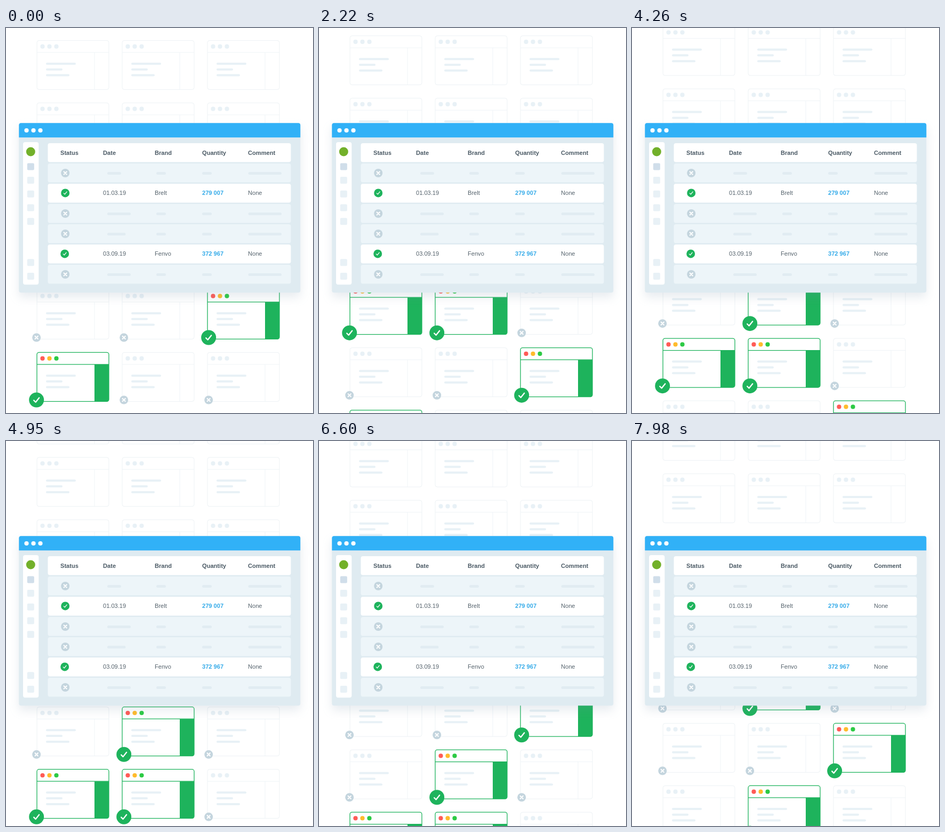
Animation, 576 px wide and 722 px high, one loop 8 s. Source, as an HTML page:

```html
<!DOCTYPE html>
<html lang="en">
<head>
<meta charset="utf-8">
<title>Report table</title>
<style>
  html, body { margin: 0; height: 100%; overflow: hidden; background: #fff; }
  svg { display: block; }
  #stage { width: 100vw; height: 100vh; }
  text { font: 11.1px "Liberation Sans", Arial, sans-serif; fill: #56636d; }
  .head { font-weight: bold; fill: #4b5a65; }
  .quantity { font-weight: bold; fill: #35abe9; }
  #window { filter: drop-shadow(0 9px 9px rgba(110, 135, 160, .16)); }
</style>
</head>
<body>
<svg id="stage" viewBox="0 0 576 722">
  <defs>
    <g id="lines" fill="#e8f1f6">
      <rect x="17" y="41.5" width="56" height="4" rx="2"/>
      <rect x="17" y="52.3" width="31" height="4" rx="2"/>
      <rect x="17" y="63.2" width="44" height="4" rx="2"/>
    </g>
    <g id="plain">
      <path d="M0 22.5H135M108 22.5V92" stroke="#eff4f7"/>
      <rect width="135" height="92" rx="4" fill="none" stroke="#edf2f5"/>
      <g fill="#e8f1f6">
        <circle cx="10.5" cy="11.3" r="4.1"/><circle cx="23.5" cy="11.3" r="4.1"/><circle cx="36.5" cy="11.3" r="4.1"/>
      </g>
      <use href="#lines"/>
    </g>
    <g id="active">
      <rect width="135" height="92" rx="4" fill="#fff" stroke="#1eb35c" stroke-width="1.3"/>
      <path d="M0 22.5H135" stroke="#1eb35c" stroke-width="1.3"/>
      <path d="M108 22.5H135V88a4 4 0 0 1-4 4H108z" fill="#1eb35c"/>
      <circle cx="10.5" cy="11.3" r="4.1" fill="#ff5b56"/>
      <circle cx="23.5" cy="11.3" r="4.1" fill="#ffbb2c"/>
      <circle cx="36.5" cy="11.3" r="4.1" fill="#2cca44"/>
      <use href="#lines"/>
    </g>
    <g id="check">
      <circle r="14" fill="#1eb35c"/>
      <path d="M-5 .8L-1.6 4.3L5-4" fill="none" stroke="#fff" stroke-width="2.3" stroke-linecap="round" stroke-linejoin="round"/>
    </g>
    <g id="cross">
      <circle r="8" fill="#c4d5de"/>
      <path d="M-2.6-2.6L2.6 2.6M2.6-2.6L-2.6 2.6" stroke="#fff" stroke-width="2.1" stroke-linecap="round"/>
    </g>
  </defs>

  <!-- Cards pass behind the window and come out checked -->
  <svg width="576" height="340" viewBox="0 0 576 340"><g id="incoming"></g></svg>
  <svg y="340" width="576" height="382" viewBox="0 340 576 382"><g id="outgoing"></g></svg>

  <g id="window">
    <rect x="24.3" y="178.3" width="528" height="318" rx="4" fill="#dfebf1"/>
    <path d="M24.3 205.3V182.3a4 4 0 0 1 4-4H548.3a4 4 0 0 1 4 4V205.3z" fill="#31b1f7"/>
  </g>
  <g fill="#fff">
    <circle cx="38.5" cy="192" r="4.1"/><circle cx="51.5" cy="192" r="4.1"/><circle cx="64.5" cy="192" r="4.1"/>
    <rect x="32" y="214" width="29.3" height="267.3" rx="4"/>
  </g>
  <circle cx="46.3" cy="232" r="8.5" fill="#72b02a"/>
  <g id="menu"></g>
  <g id="table"></g>
</svg>

<script>
const byId = id => document.getElementById(id);
const rect = (x, y, w, h, r, fill) =>
  `<rect x="${x}" y="${y}" width="${w}" height="${h}" rx="${r}" fill="${fill}"/>`;
const use = (id, x, y, scale = 1) =>
  `<use href="#${id}" transform="translate(${x} ${y}) scale(${scale})"/>`;
const label = (x, y, text, kind = "") => `<text x="${x}" y="${y}" class="${kind}">${text}</text>`;

// Sidebar and table
byId("menu").innerHTML = [260, 285.6, 311.3, 337, 362.7, 439.7, 465.4]
  .map((y, i) => rect(39.8, y - 6.5, 13, 13, 2, i ? "#e8f1f6" : "#d0deea")).join("");

const columns = [182, 279, 368, 454];
const rows = [
  { head: ["Date", "Brand", "Quantity", "Comment"] },
  { dateWidth: 26 },
  { values: ["01.03.19", "Brelt", "279 007", "None"], checkX: 111.2 },
  { dateWidth: 44 },
  { dateWidth: 34.5 },
  { values: ["03.09.19", "Fenvo", "372 967", "None"], checkX: 110.2 },
  { dateWidth: 44 },
];

function tableRow({ head, values, dateWidth, checkX }, i) {
  const top = 216 + 38 * i;
  const y = top + 18;
  const back = rect(78.5, top, 456, 35.5, 4, dateWidth ? "#edf5f9" : "#fff");
  if (head) {
    return back + label(102, y + 4.4, "Status", "head") +
      head.map((text, c) => label(columns[c], y + 4.4, text, "head")).join("");
  }
  if (values) {
    return back + use("check", checkX, y - .6, .57) +
      values.map((text, c) => label(columns[c], y + 3.4, text, c === 2 ? "quantity" : "")).join("");
  }
  const bars = [[190, dateWidth], [282, 18], [368, 18], [454.5, 62.5]];
  return back + use("cross", 111.2, y) +
    bars.map(([x, w]) => rect(x, y - 2, w, 5, 2.5, "#e1ecf2")).join("");
}
byId("table").innerHTML = rows.map(tableRow).join("");

// Scrolling cards, listed from the lowest row upwards
const cardX = [58, 218, 378];
const badgeX = [57.2, 221.2, 380.2];
const PITCH = 117;
const activeColumns = [[0], [2], [0, 1], [1], [2], [1]];

let incoming = "", outgoing = "";
for (let row = 0; row < 10; row++) {
  const y = 608.4 - PITCH * row;
  cardX.forEach((x, c) => {
    const isActive = activeColumns[row % activeColumns.length].includes(c);
    incoming += use("plain", x, y);
    outgoing += use(isActive ? "active" : "plain", x, y) +
      use(isActive ? "check" : "cross", badgeX[c], y + 89.1);
  });
}
byId("incoming").innerHTML = incoming;
byId("outgoing").innerHTML = outgoing;

const LOOP = 8000, STEP = 30, ROW_TIME = 2400;
const start = performance.now();

function draw() {
  const time = (performance.now() - start) % LOOP;
  const shift = Math.floor(time / STEP) * STEP / ROW_TIME * PITCH;
  for (const id of ["incoming", "outgoing"]) {
    byId(id).setAttribute("transform", `translate(0 ${shift})`);
  }
  requestAnimationFrame(draw);
}
draw();
</script>
</body>
</html>
```
